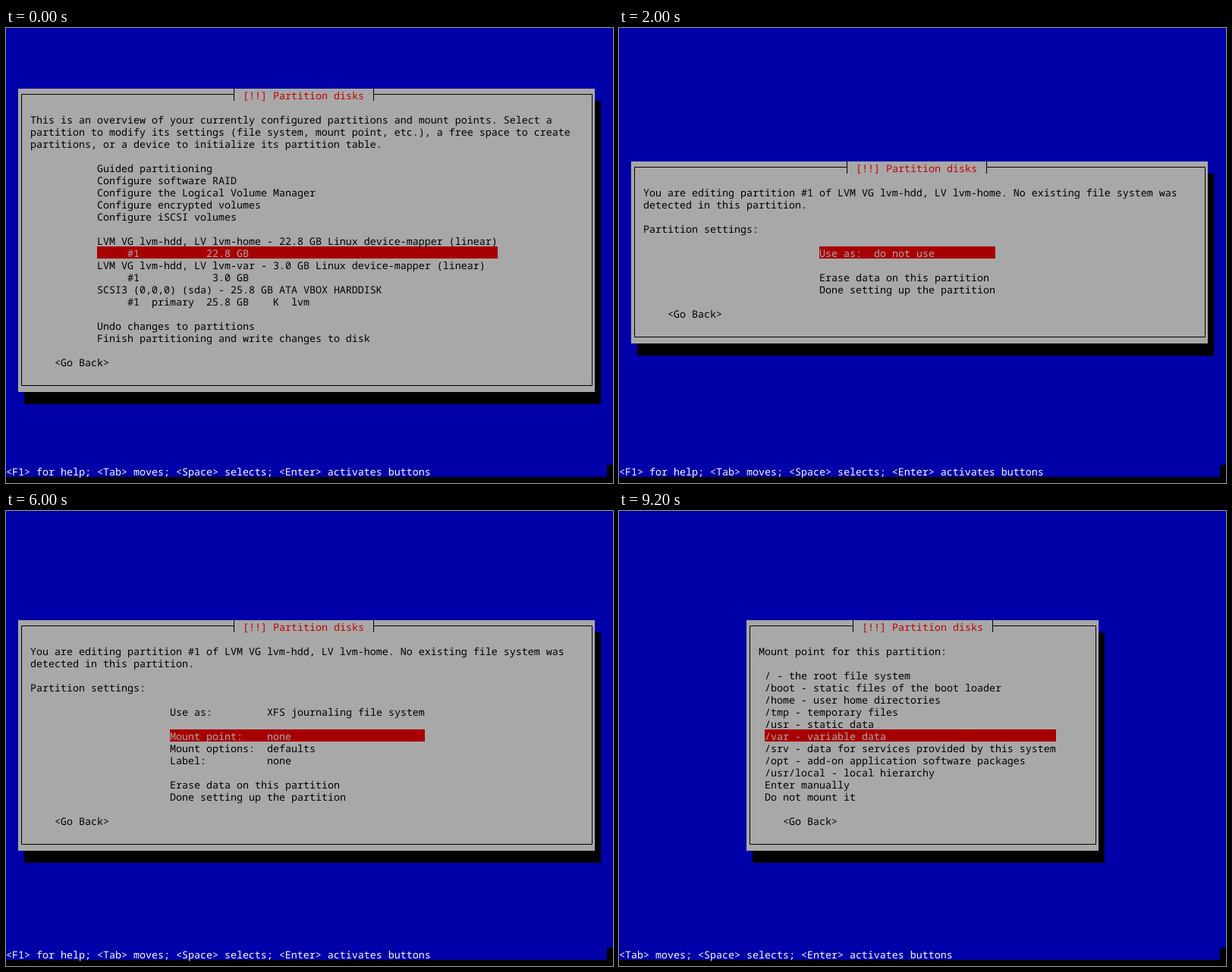
These frames come from a looping animation (800x600 px, 10000 ms). An HTML page:

```html
<!DOCTYPE html>
<html lang="en">
<head>
<meta charset="utf-8">
<title>Partition disks</title>
<style>
  html, body { margin: 0; width: 100%; height: 100%; overflow: hidden; background: #0000a8; }
  svg { display: block; width: 800px; height: 600px; }
  text {
    font: 300 13.333px "Noto Sans Mono", "DejaVu Sans Mono", monospace;
    white-space: pre;
    text-rendering: geometricPrecision;
  }
</style>
</head>
<body>
<svg id="stage" viewBox="0 0 800 600"></svg>
<script>
// Text-mode screen: every measure below is in 8x16 character cells.
const CELL_W = 8, CELL_H = 16, BASELINE = 14;
const HOLD = 2000, ACTIVE_ROW = 18;
const BLUE = '#0000a8', GRAY = '#a8a8a8', RED = '#a80000', WHITE = '#fcfcfc';
const TITLE = '[!!] Partition disks', TITLE_RED = '#c00000';
const KEYS = '<Tab> moves; <Space> selects; <Enter> activates buttons';
const HELP_KEYS = '<F1> for help; ' + KEYS;

const editing = [
  'You are editing partition #1 of LVM VG lvm-hdd, LV lvm-home. No existing file system was',
  'detected in this partition.',
  '',
  'Partition settings:'
];

const screens = [
  {
    left: 2, top: 5, width: 95, titleCol: 39, listCol: 15, backCol: 8, status: HELP_KEYS,
    intro: [
      'This is an overview of your currently configured partitions and mount points. Select a',
      'partition to modify its settings (file system, mount point, etc.), a free space to create',
      'partitions, or a device to initialize its partition table.'
    ],
    list: [
      'Guided partitioning',
      'Configure software RAID',
      'Configure the Logical Volume Manager',
      'Configure encrypted volumes',
      'Configure iSCSI volumes',
      '',
      'LVM VG lvm-hdd, LV lvm-home - 22.8 GB Linux device-mapper (linear)',
      '     #1           22.8 GB',
      'LVM VG lvm-hdd, LV lvm-var - 3.0 GB Linux device-mapper (linear)',
      '     #1            3.0 GB',
      'SCSI3 (0,0,0) (sda) - 25.8 GB ATA VBOX HARDDISK',
      '     #1  primary  25.8 GB    K  lvm',
      '',
      'Undo changes to partitions',
      'Finish partitioning and write changes to disk'
    ]
  },
  {
    left: 2, top: 11, width: 95, titleCol: 39, listCol: 33, backCol: 8, status: HELP_KEYS,
    intro: editing,
    list: [
      'Use as:  do not use',
      '',
      'Erase data on this partition',
      'Done setting up the partition'
    ]
  },
  {
    left: 30, top: 9, width: 40, titleCol: 40, listCol: 33, backCol: 36, status: HELP_KEYS,
    intro: ['How to use this partition:'],
    list: [
      'Ext4 journaling file system',
      'Ext3 journaling file system',
      'Ext2 file system',
      'btrfs journaling file system',
      'JFS journaling file system',
      'XFS journaling file system',
      'FAT16 file system',
      'FAT32 file system',
      'swap area',
      'physical volume for encryption',
      'do not use the partition'
    ]
  },
  {
    left: 2, top: 9, width: 95, titleCol: 39, listCol: 27, backCol: 8, status: HELP_KEYS,
    intro: editing,
    list: [
      'Use as:         XFS journaling file system',
      '',
      'Mount point:    none',
      'Mount options:  defaults',
      'Label:          none',
      '',
      'Erase data on this partition',
      'Done setting up the partition'
    ]
  },
  {
    left: 21, top: 9, width: 58, titleCol: 40, listCol: 24, backCol: 27, status: KEYS,
    intro: ['Mount point for this partition:'],
    list: [
      '/ - the root file system',
      '/boot - static files of the boot loader',
      '/home - user home directories',
      '/tmp - temporary files',
      '/usr - static data',
      '/var - variable data',
      '/srv - data for services provided by this system',
      '/opt - add-on application software packages',
      '/usr/local - local hierarchy',
      'Enter manually',
      'Do not mount it'
    ]
  }
];

const escapeText = s => s.replace(/&/g, '&amp;').replace(/</g, '&lt;');

const rect = (x, y, w, h, fill) =>
  `<rect x="${x}" y="${y}" width="${w}" height="${h}" fill="${fill}"/>`;

const cells = (col, row, w, h, fill) =>
  rect(col * CELL_W, row * CELL_H, w * CELL_W, h * CELL_H, fill);

const write = (col, row, s, fill = '#000') => s &&
  `<text x="${col * CELL_W}" y="${row * CELL_H + BASELINE}" fill="${fill}">${escapeText(s)}</text>`;

// Single-line frame, open at the top between two tees around the title.
function border({ left, top, width, titleCol }, height) {
  const midX = col => col * CELL_W + 4.5;
  const midY = row => row * CELL_H + 7.5;
  const x1 = midX(left), x2 = midX(left + width - 1);
  const y1 = midY(top), y2 = midY(top + height - 1);
  const tee1 = midX(titleCol - 2), tee2 = midX(titleCol + TITLE.length + 1);
  const teeTop = top * CELL_H;
  return `<path fill="none" stroke="#000" d="M${tee1} ${y1}H${x1}V${y2}H${x2}V${y1}H${tee2}"/>` +
    `<path stroke="#000" d="M${tee1} ${teeTop}v${CELL_H}M${tee2} ${teeTop}v${CELL_H}"/>`;
}

function drawScreen(screen) {
  const { left, top, width, titleCol, listCol, backCol, intro, list, status } = screen;
  const introRow = top + 2;
  const listRow = introRow + intro.length + 1;
  const backRow = listRow + list.length + 1;
  const height = backRow + 3 - top;
  const listWidth = Math.max(...list.map(s => s.length));
  return [
    rect(0, 0, 800, 600, BLUE),
    rect(0, 592, 800, 8, '#000'),
    rect(792, 576, 8, 24, '#000'),
    cells(left + 1, top + 1, width, height, '#000'),
    cells(left, top, width, height, GRAY),
    border(screen, height),
    write(titleCol, top, TITLE, TITLE_RED),
    ...intro.map((s, i) => write(left + 2, introRow + i, s)),
    cells(listCol, ACTIVE_ROW, listWidth, 1, RED),
    ...list.map((s, i) => write(listCol, listRow + i, s, listRow + i === ACTIVE_ROW ? GRAY : '#000')),
    write(backCol, backRow, '<Go Back>'),
    write(0, 36, status, WHITE)
  ].join('');
}

const stage = document.getElementById('stage');
const start = performance.now();
let shown = -1;

function update(now) {
  const index = Math.floor(Math.max(0, now - start) / HOLD) % screens.length;
  if (index !== shown) {
    stage.innerHTML = drawScreen(screens[index]);
    shown = index;
  }
  requestAnimationFrame(update);
}
update(start);
</script>
</body>
</html>
```
